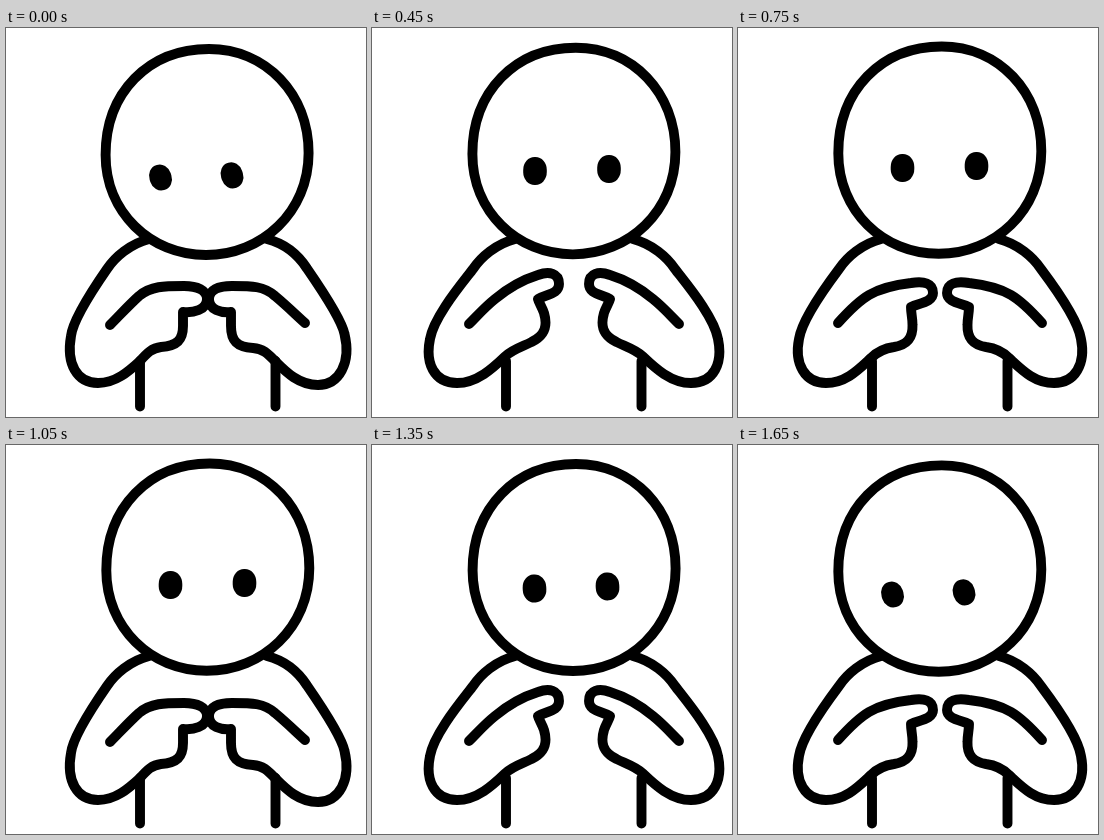
Write an HTML page that moves like this. It is 360 px wide and 389 px high and loops after 1800 ms.

```html
<!DOCTYPE html>
<html lang="en">
<head>
<meta charset="utf-8">
<title>Fidgeting fingers</title>
<style>
  html, body { margin: 0; width: 100%; height: 100%; overflow: hidden; background: #fff; }
  svg { display: block; width: 100%; height: 100%; }
  .line { fill: none; stroke: #000; stroke-width: 9.9; stroke-linecap: round; stroke-linejoin: round; }
  #head { fill: #fff; }
</style>
</head>
<body>
<svg viewBox="0 0 360 389">
  <path class="line" d="M134 333V378.5M269.5 333V378.5"/>
  <path class="line" id="left"/>
  <path class="line" id="right"/>
  <path class="line" id="head" d="M99.6 127C99.6 64.5 142.5 21 203 21C260 21 302.6 66 302.6 125C302.6 184 256 227 200 227C144 227 99.6 184 99.6 127Z"/>
  <rect class="eye"/>
  <rect class="eye"/>
</svg>
<script>
const STEP = 150;
const $ = id => document.getElementById(id);

const shoulder = 'M143 211C124 216 109 229 101 241';
const wideElbow = 'C92 253 62 288 58 311C53 335 62 355 85 355C105 355 121 340 133 328.5C141 321 152 318 159.5 314';

const arms = {
  touch: shoulder +
    'C92 254 67 291 65 308C60 336 71 355 92 355C110 355 123 343 134 333' +
    'C141 325 146 320 155 319C171 318 177 312 177 298C177 291 177 289 177 284' +
    'C187 285 201 282 201 271C201 262 191 258 178 258C158 258 145 258 133 268C123 277 114 287 104 297',
  near: shoulder +
    'C92 253 64 291 61 311C56 336 67 355 88 355C108 355 121 341 133 330' +
    'C141 322 149 320 156 319C168 317 175 311 174.5 297C174.5 289 173 286 173 279' +
    'C182 275 195 274 195 265C195 255 186 253 173 255C156 257 143 260 131 267C119 274 109 285 100 295',
  apart: shoulder + wideElbow +
    'C174 307 175.5 297 172 285C170 279 167 275 166 271' +
    'C175 266 187 266 187 256C187 245 177 243 166 247C150 252 135 261 123 271C113 279 105 288 97 296',
  wide: shoulder + wideElbow +
    'C174 307 175.5 297 172 284C170 276 166 272 165 267' +
    'C174 261 186 263 186 251C186 240 173 237 160 243C148 248 136 258 125 267.5C114 278 105 287 96 296'
};

// The touching pose is not quite symmetric.
const touchRight = 'M261 211C280 216 293 228 301 240.5' +
  'C311 255 335.5 291 338.5 306C345.5 335 333 357 312 357C293 357 280 344 270 334' +
  'C262 326 258 321 247 320C231 319 225 313 225 298C225 291 225 289 225 284' +
  'C215 285 203 282 203 271C203 262 212 258 226 258C246 258 258 258 269 268C280 277 290 287 299 295';

const armCycle = ['touch', 'touch', 'near', 'apart', 'wide', 'near'];

// Head shift x, lift; left eye x, y; eye gap; eye tilt
const down = [0, 0, 154.5, 149.5, 71.5, -18];
const up = [.7, 2.5, 164.5, 140, 74, 0];
const looks = [
  down, down,
  [.7, .6, 158.5, 147.5, 71, -13],
  [.8, 1.3, 163, 143, 74, 0],
  [.8, 2, 164, 141, 74, 0],
  up, up, up, up,
  [1, 2, 162.5, 143.5, 73, -3],
  [1.2, 1.3, 157.5, 148.5, 71, -13],
  [.7, .6, 154.5, 149.5, 71.5, -18]
];

const CHIN = 227, HEIGHT = 206;
const left = $('left'), right = $('right'), head = $('head');
const eyes = document.querySelectorAll('.eye');

function drawArms(pose) {
  left.setAttribute('d', arms[pose]);
  right.setAttribute('d', pose === 'touch' ? touchRight : arms[pose]);
  right.setAttribute('transform', pose === 'touch' ? '' : 'translate(404 0) scale(-1 1)');
}

function drawHead([dx, lift, x, y, gap, tilt]) {
  // The chin rises half as far as the crown.
  const stretch = 1 + lift / 2 / HEIGHT;
  head.setAttribute('transform',
    `translate(${dx} ${CHIN - lift / 2}) scale(1 ${stretch}) translate(0 ${-CHIN})`);
  const rx = tilt < -5 ? 11 : 11.8, ry = tilt < -5 ? 13.1 : 14;
  const box = { x: -rx, y: -ry, width: rx * 2, height: ry * 2, rx: rx * .96, ry: ry * .92 };
  eyes.forEach((eye, i) => {
    for (const k in box) eye.setAttribute(k, box[k]);
    eye.setAttribute('transform', `translate(${x + i * gap} ${y - i * 2.1}) rotate(${tilt})`);
  });
}

const start = performance.now();
let shown = -1;

function frame() {
  const step = Math.floor((performance.now() - start) / STEP) % looks.length;
  if (step !== shown) {
    shown = step;
    drawArms(armCycle[step % armCycle.length]);
    drawHead(looks[step]);
  }
  requestAnimationFrame(frame);
}
frame();
</script>
</body>
</html>
```
